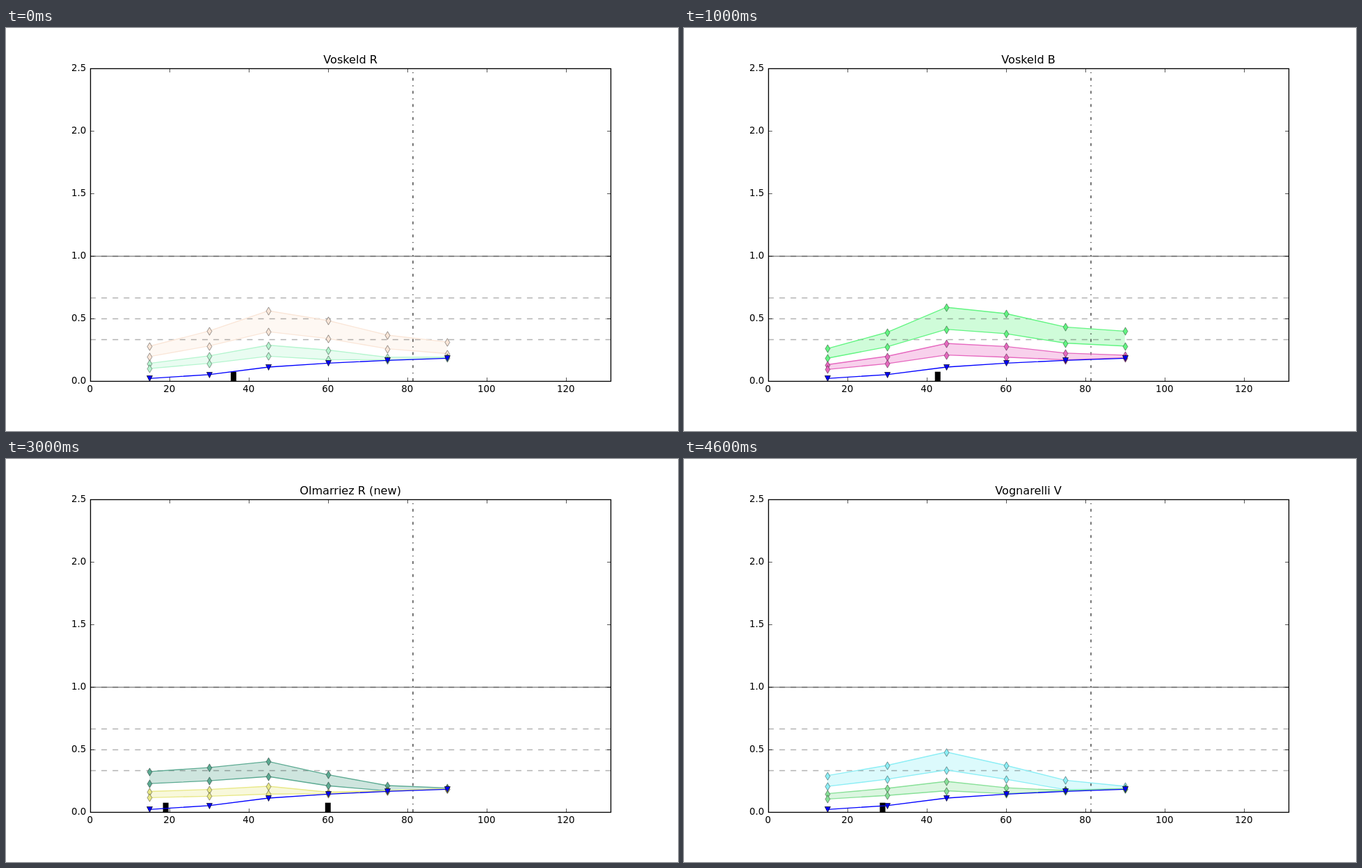
Recreate the animation shown at these times as an HTML page. Size 966 px wide and 580 px high, loop 5000 ms.

```html
<!DOCTYPE html>
<html lang="en">
<head>
<meta charset="utf-8">
<title>Band chart</title>
<style>
  html, body { margin: 0; width: 100%; height: 100%; overflow: hidden; background: #fff; }
  svg { display: block; width: 966px; height: 580px; }
  text { font: 13.4px "DejaVu Sans", sans-serif; }
  .title { font-size: 16.1px; text-anchor: middle; }
  .mid { text-anchor: middle; }
  .end { text-anchor: end; }
  .line { fill: none; stroke-width: 1.34; }
  .scene { visibility: hidden; animation: turn 5s step-end infinite; }
  @keyframes turn {
    0% { visibility: visible; }
    20%, 100% { visibility: hidden; }
  }
</style>
</head>
<body>
<svg viewBox="0 0 966 580">
  <clipPath id="plot"><rect x="121" y="58" width="749" height="450"/></clipPath>
  <g id="under" clip-path="url(#plot)"></g>
  <g id="guides" clip-path="url(#plot)"></g>
  <g id="over" clip-path="url(#plot)"></g>
  <g id="base" clip-path="url(#plot)"></g>
  <g id="axes"></g>
  <g id="titles"></g>
</svg>
<script>
const LEFT = 120.75, ZERO = 507.5, UNIT_X = 5.7, UNIT_Y = 179.8;
const toX = v => LEFT + v * UNIT_X;
const toY = v => ZERO - v * UNIT_Y;
const snap = p => Math.floor(p + 0.5) + 0.5;
const xs = [15, 30, 45, 60, 75, 90].map(toX);
const baseline = [504.3, 498.9, 488, 482.4, 478.4, 475.4];

// Upper edges of both bands in pixels; the lower edges follow from the first.
const scenes = [
  { title: "Voskeld R", bars: [36.2], colors: ["#fae6d8", "#b5f5cf"],
    high: [458, 436.2, 407, 421, 442, 451.8], low: [482.7, 471.8, 456.5, 463.5, 473.8, 473.6] },
  { title: "Voskeld B", bars: [42.8], colors: ["#62f582", "#e668bf"],
    high: [461.4, 438, 402, 411, 430.4, 436.4], low: [484.5, 472.5, 454, 458.4, 467.8, 470.8] },
  { title: "Beltiz-Orano J", bars: [29.1], colors: ["#97aee0", "#63c286"],
    high: [456, 440.8, 421.8, 440.3, 461.5, 470.8], low: [481.8, 474, 464, 473, 477, 474] },
  { title: "Olmarriez R (new)", bars: [19.1, 60], colors: ["#5caa92", "#e8e887"],
    high: [449.8, 444.2, 435.4, 454.3, 470, 473.3], low: [478.5, 475.6, 471, 479.5, 477.3, 474.5] },
  { title: "Vognarelli V", bars: [28.9], colors: ["#8ceef5", "#87e097"],
    high: [455.6, 441, 421.8, 441, 462.3, 471], low: [481.7, 474, 464, 473.2, 477, 474.2] }
];

function add(parent, tag, attrs, text) {
  const el = document.createElementNS("http://www.w3.org/2000/svg", tag);
  for (const key in attrs) el.setAttribute(key, attrs[key]);
  if (text !== undefined) el.textContent = text;
  parent.appendChild(el);
  return el;
}
const layer = id => document.getElementById(id);
const pairs = ys => ys.map((y, i) => [xs[i], y]);
const scaled = (ys, k) => ys.map((y, i) =>
  Math.min(ZERO - k * (ZERO - y), baseline[i] - 0.8));

function curve(parent, ys, color, marker, edge) {
  add(parent, "polyline", { class: "line", points: pairs(ys).join(" "), stroke: color });
  pairs(ys).forEach(([x, y]) => add(parent, "path", {
    d: `M${snap(x)} ${snap(y)}${marker}`, fill: color,
    stroke: "#000", "stroke-width": 0.67, "stroke-opacity": edge
  }));
}

const DIAMOND = "m0-5.7l3.4 5.7l-3.4 5.7l-3.4-5.7z";
const TRIANGLE = "m-4-4h8l-4 8z";

function turnGroup(id, index) {
  const g = add(layer(id), "g", { class: "scene" });
  g.style.animationDelay = `${index - scenes.length}s`;
  return g;
}

scenes.forEach((scene, i) => {
  const under = turnGroup("under", i);
  const over = turnGroup("over", i);
  const bands = [[scene.high, scaled(scene.high, 0.7)],
                 [scene.low, scaled(scene.high, 0.35)]];
  bands.forEach(([top, bottom], k) => {
    const color = scene.colors[k];
    add(under, "polygon", {
      points: pairs(top).concat(pairs(bottom).reverse()).join(" "),
      fill: color, "fill-opacity": 0.3
    });
    curve(over, top, color, DIAMOND, 0.6);
    curve(over, bottom, color, DIAMOND, 0.6);
  });
  scene.bars.forEach(v => add(over, "rect",
    { x: toX(v) - 4, y: 494.7, width: 8, height: 14 }));
  add(turnGroup("titles", i), "text", { class: "title", x: 495.1, y: 51 }, scene.title);
});

function guide(d, opacity, dash) {
  add(layer("guides"), "path", {
    class: "line", d, stroke: "#000", "stroke-opacity": opacity, "stroke-dasharray": dash
  });
}
guide(`M121 ${snap(toY(1))}H870`, 0.45, "none");
[1 / 3, 1 / 2, 2 / 3, 1].forEach(v => guide(`M121 ${snap(toY(v))}H870`, 0.3, "8.05 8.05"));
guide("M585 508V58", 0.8, "4.03 6.71 1.34 6.71");

curve(layer("base"), baseline, "#00f", TRIANGLE, 1);

const axes = layer("axes");
let ticks = "";
for (let v = 0; v <= 120; v += 20) {
  const x = snap(toX(v));
  ticks += `M${x} 508.5v-5.4M${x} 58.5v5.4`;
  add(axes, "text", { class: "mid", x: toX(v), y: 524 }, v);
}
for (let v = 0; v <= 2.5; v += 0.5) {
  const y = snap(toY(v));
  ticks += `M121.5 ${y}h5.4M869.5 ${y}h-5.4`;
  add(axes, "text", { class: "end", x: 115.4, y: Math.round(toY(v) + 4.2) }, v.toFixed(1));
}
add(axes, "path", { d: ticks, stroke: "#000", "stroke-width": 0.67 });
add(axes, "rect", { class: "line", x: 121.5, y: 58.5, width: 748, height: 450, stroke: "#000" });
</script>
</body>
</html>
```
